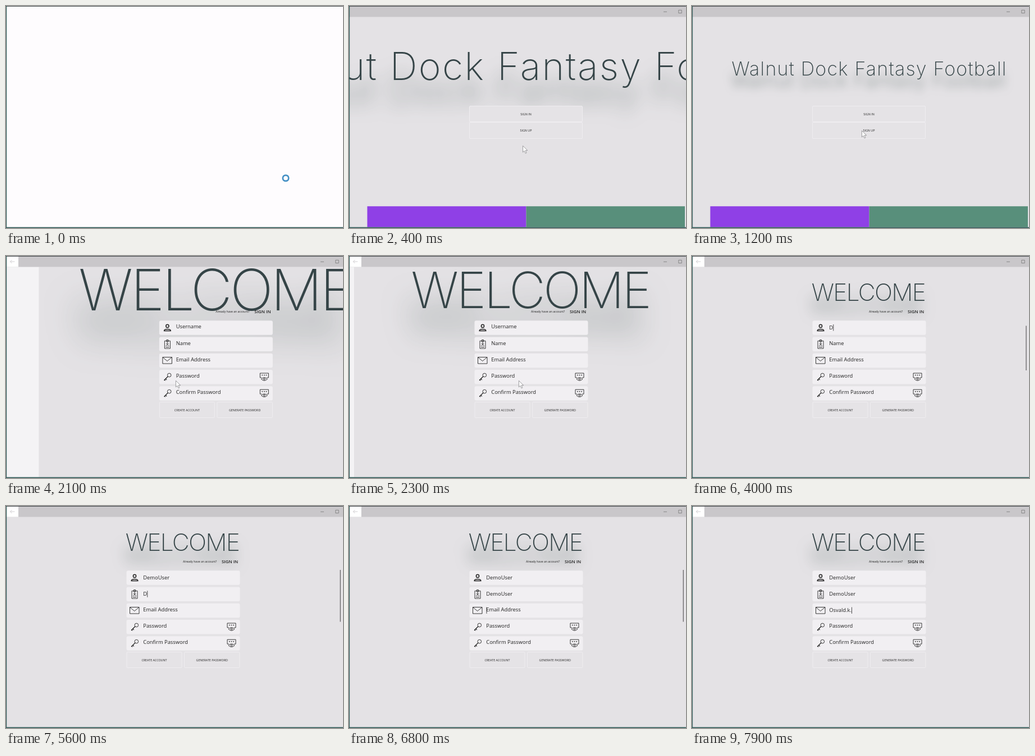
Recreate the animation shown at these times as an HTML page. Size 600 px wide and 396 px high, loop 8 s.

```html
<!DOCTYPE html>
<html lang="en">
<head>
<meta charset="utf-8">
<title>Sign up</title>
<style>
  html, body { margin: 0; width: 100%; height: 100%; overflow: hidden; background: #fefcfe; }
  svg { display: block; width: 600px; height: 396px; font-family: "Open Sans", sans-serif; fill: #222; }
  .title { font-family: Inter, sans-serif; font-weight: 200; fill: #354447; text-anchor: middle; }
  #homeTitle text { filter: drop-shadow(-1px 21px 8px rgba(45, 68, 62, .7)); }
  #welcome text { filter: drop-shadow(-3px 23px 12px rgba(45, 68, 62, .7)); }
  .button rect { fill: #e5e3e6; stroke: #efedf0; }
  .button text { font-size: 5.4px; text-anchor: middle; }
  .field { fill: #f1eff2; }
  .field-text { font-size: 9.35px; }
  .icon { fill: none; stroke: #222; stroke-width: .9; }
</style>
</head>
<body>
<svg viewBox="0 0 600 396">
  <defs>
    <clipPath id="content"><rect x="1" y="19.5" width="599" height="375"/></clipPath>
    <g id="key" class="icon">
      <circle cx="3.3" cy="-3" r="3.3"/><path d="M1-.7-6 6.2M-3.3 3.4-1.3 5.5M-5.3 5.2-3.8 6.7" style="stroke-width:1.3"/>
    </g>
    <g id="reveal" class="icon">
      <path d="M-4.5 2H-7.5V-6H7.5V2H4.5"/>
      <path d="M-4.4-2.5h1.6M-.8-2.5H.8M2.8-2.5H4.4" style="stroke-width:1.6"/>
      <path d="M-5.5 4.5Q0-1 5.5 4.5Q0 10-5.5 4.5Z"/><circle cy="4.4" r="1.5"/>
    </g>
  </defs>

  <g id="app">
    <rect id="backdrop" width="600" height="396" fill="#e4e2e5"/>
    <g clip-path="url(#content)">
      <g id="home">
        <g id="homeTitle"><text class="title" x="315.5" y="123.5" font-size="34" letter-spacing=".035em">Walnut Dock Fantasy Football</text></g>
        <g id="homeButtons"></g>
        <path d="M32.5 357.3H315.5V396H32.5Z" fill="#8f40e6"/>
        <path d="M315.5 357.3H598V396H315.5Z" fill="#588f7b"/>
      </g>
      <g id="register">
        <rect width="600" height="396" fill="#e4e2e5"/>
        <g id="welcome"><text class="title" x="314" y="79.7" font-size="42.5" letter-spacing="-.039em">WELCOME</text></g>
        <text x="315" y="101" font-size="5.1">Already have an account?</text>
        <text x="384" y="102" font-size="7.9" font-weight="600">SIGN IN</text>
        <g id="fields"></g>
        <g class="icon">
          <g style="stroke-width:1.5">
            <circle cx="229" cy="124.9" r="2.6"/>
            <path d="M223.2 133.4Q223.2 130.4 229 130.4T234.8 133.4Z"/>
          </g>
          <path d="M224 151.5H234V165H224ZM227.5 153V149.5H230.5V153ZM226 162.5H232M226 160.5Q229 157 232 160.5"/>
          <circle cx="229" cy="156.3" r="1.3"/>
          <path d="M220.5 180.5H237V192H220.5ZL228.7 187.5 237 180.5"/>
        </g>
        <use href="#key" x="229" y="215.5"/><use href="#key" x="229" y="244.7"/>
        <use href="#reveal" x="401.5" y="215"/><use href="#reveal" x="401.5" y="244.2"/>
        <g id="formButtons"></g>
      </g>
    </g>
    <rect width="600" height="19.5" fill="#c9c7ca"/>
    <g id="back">
      <rect x="1" y="1" width="21" height="18.5" fill="#fff"/>
      <path d="M15.5 10H7.5M10.5 7 7.5 10 10.5 13" fill="none" stroke="#d0ced1"/>
    </g>
    <path d="M560 10.3H566M586.8 7.3H592.2V12.7H586.8Z" fill="none" stroke="#777" stroke-width=".8"/>
    <path id="scrollbar" fill="none" stroke="#6d6c6f" stroke-width="1.4"/>
  </g>

  <path d="M0 .5H600" stroke="#414648"/>
  <path d="M.5 0V396M0 395.2H600" stroke="#2f5a57" stroke-width="1.4"/>
  <circle id="spinner" cx="498" cy="307" r="5.2" fill="none" stroke="#438fc4" stroke-width="2.7"/>
  <path id="arrow" d="M0 0V11.5L2.7 9 4.7 13.5 6.5 12.6 4.6 8.3H8.3Z" fill="#fff" stroke="#858487" stroke-width=".8"/>
</svg>
<script>
const LOOP = 8000;
const $ = id => document.getElementById(id);
const clamp = v => Math.min(1, Math.max(0, v));
const mix = (a, b, u) => a + (b - a) * u;
const show = (id, on) => $(id).style.display = on ? '' : 'none';

const button = (x, y, w, h, label) => `<g class="button">
  <rect x="${x}" y="${y}" width="${w}" height="${h}" rx="1.5"/>
  <text x="${x + w / 2}" y="${y + h / 2 + 2}">${label}</text></g>`;

$('homeButtons').innerHTML =
  button(214.5, 178.5, 201, 28, 'SIGN IN') + button(214.5, 207.5, 201, 29, 'SIGN UP');
$('formButtons').innerHTML =
  button(215, 260.5, 98, 28, 'CREATE ACCOUNT') + button(317.5, 260.5, 98.5, 28, 'GENERATE PASSWORD');

// keys: the time of each typed character
const fields = [
  { hint: 'Username', value: 'DemoUser', focus: 3200, blur: 5300,
    keys: [4000, 4300, 4500, 4500, 4800, 5000, 5100, 5200] },
  { hint: 'Name', value: 'DemoUser', focus: 5300, blur: 6800,
    keys: [5600, 5800, 6000, 6100, 6200, 6400, 6600, 6600] },
  { hint: 'Email Address', value: 'Osvald.k.', focus: 6800, blur: LOOP,
    keys: [6900, 7000, 7100, 7200, 7300, 7400, 7500, 7800, 7900] },
  { hint: 'Password', value: '', keys: [] },
  { hint: 'Confirm Password', value: '', keys: [] }
];
fields.forEach((field, i) => {
  field.top = 115.3 + 29.25 * i;
  $('fields').insertAdjacentHTML('beforeend', `<g>
    <rect class="field" x="214.5" y="${field.top}" width="202" height="25.5" rx="3"/>
    <text class="field-text" x="244.3"></text>
    <rect width=".8" height="11.5" y="${field.top + 6.7}"/></g>`);
  [, field.text, field.caret] = $('fields').lastElementChild.children;
});

function drawField(field, t) {
  const typed = field.value.slice(0, field.keys.filter(k => k <= t).length);
  field.text.textContent = typed || field.hint;
  field.text.setAttribute('y', field.top + (typed ? 15.6 : 14));
  const focused = t >= field.focus && t < field.blur;
  field.caret.style.display = focused ? '' : 'none';
  if (focused) field.caret.setAttribute('x', 244.6 + (typed ? field.text.getComputedTextLength() : 0));
}

function zoom(id, cx, cy, start, t) {
  const s = mix(2.4, 1, clamp((t - start) / 700));
  $(id).setAttribute('transform', `translate(${cx} ${cy}) scale(${s}) translate(${-cx} ${-cy})`);
}

const path = [[100, 498, 307], [400, 309.6, 249.4], [1200, 302.4, 222.4], [2800, 302.4, 222.4], [3100, 280, 125]];
function drawCursor(t) {
  show('spinner', t < 200);
  show('arrow', t >= 200 && t < 3100);
  const i = Math.max(1, path.findIndex(p => p[0] > t));
  const [t0, x0, y0] = path[i - 1], [t1, x1, y1] = path[i];
  const u = clamp((t - t0) / (t1 - t0));
  $('arrow').setAttribute('transform', `translate(${mix(x0, x1, u)} ${mix(y0, y1, u)})`);
}

function draw(t) {
  show('app', t >= 100);
  show('home', t >= 200 && t < 1900);
  show('register', t >= 2000);
  show('back', t >= 1900);
  $('backdrop').setAttribute('fill', t >= 1900 && t < 2800 ? '#f4f3f5' : '#e4e2e5');
  zoom('homeTitle', 315, 115, 200, t);
  zoom('welcome', 314, 67.5, 2150, t);
  const slide = t < 2800 ? 150 * Math.exp(-(t - 2000) / 107) : 0;
  $('register').setAttribute('transform', `translate(${slide})`);
  show('scrollbar', t >= 2700 && t < 7000);
  $('scrollbar').setAttribute('d', t < 5300 ? 'M595 124.5V204' : 'M595.3 114V206.5');
  fields.forEach(field => drawField(field, t));
  drawCursor(t);
}

function tick() {
  draw(performance.now() % LOOP);
  requestAnimationFrame(tick);
}
tick();
</script>
</body>
</html>
```
